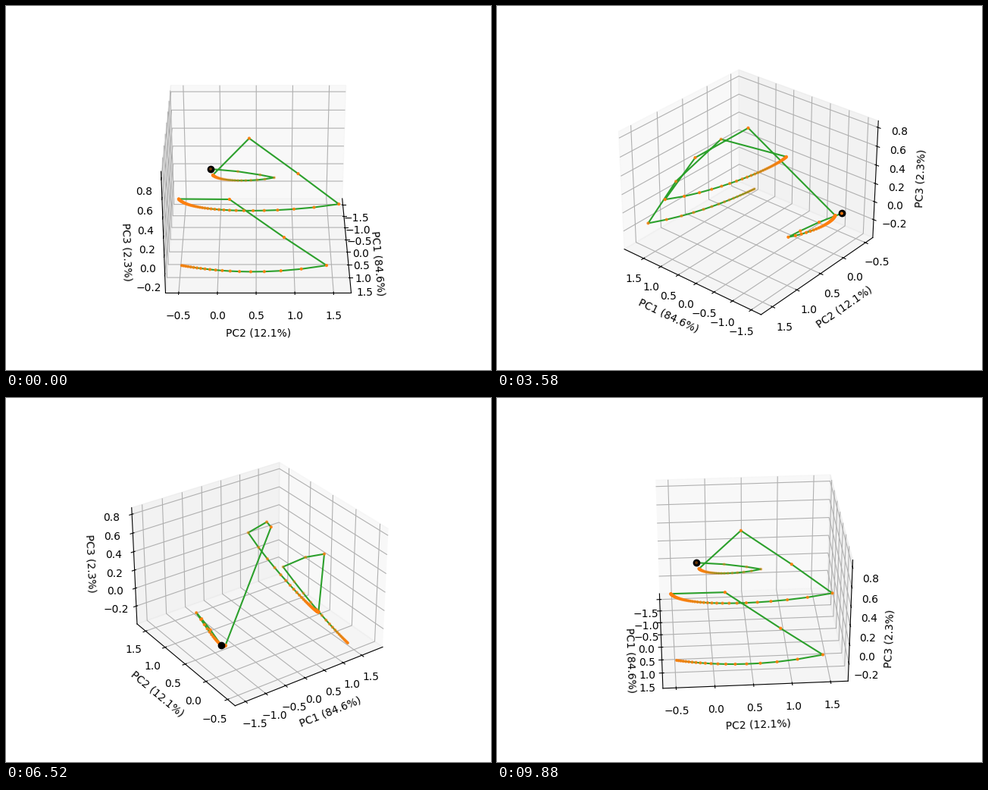
A matplotlib script that plays this animation: 640 px wide and 480 px high, repeating every 9.9 s.

```python
import numpy as np
import matplotlib.pyplot as plt
from matplotlib.animation import FuncAnimation

TICK = 20            # ms per animation frame
TICKS = 495
VIEWS = 119          # camera positions in one turn

XLIM, YLIM, ZLIM = (-1.758, 2.070), (-0.670, 1.727), (-0.4026, 0.8688)
BOX = np.array([4 / np.ptp(XLIM), 4 / np.ptp(YLIM), 3 / np.ptp(ZLIM)])


def decay(start, pull, drift, end, steps):
    """Points slowing down along the Bezier curve of four control points."""
    t = np.linspace(0, 1, 400)[:, None]
    curve = ((1 - t)**3 * start + 3 * t * (1 - t)**2 * pull
             + 3 * t**2 * (1 - t) * drift + t**3 * end)
    length = np.r_[0, np.cumsum(np.linalg.norm(np.diff(curve, axis=0) * BOX,
                                               axis=1))]
    k = np.arange(steps + 1)
    u = 1 - 0.45 * 0.76**k - 0.55 * 0.92**k
    s = u / u[-1] * length[-1]
    return np.column_stack([np.interp(s, length, c) for c in curve.T])


def leap(start, end, stops, bow):
    """Points on a slightly arched jump, without its end."""
    t = np.array(stops)[:, None]
    return start + (end - start) * t + bow * t * (1 - t) * [0, 0, 1]


def point(*xyz):
    return np.array(xyz)


origin, tip = point(-1.513, -0.140, 0.001), point(-1.197, 0.750, -0.0175)
path = np.vstack([
    leap(origin, tip, (0, 0.43, 0.78), 0.057),
    decay(tip, point(-1.237, 0.50, -0.07), point(-1.384, -0.02, -0.12),
          point(-1.380, -0.108, -0.034), 50),
    point(0.346, 0.410, 0.787), point(0.950, 1.040, 0.5656),
    decay(point(1.047, 1.572, 0.270), point(0.87, 0.85, 0.125),
          point(0.66, -0.37, 0.06), point(0.494, -0.523, 0.180), 50),
    point(1.455, 0.161, 0.4268), point(1.797, 0.857, 0.1178),
    decay(point(1.824, 1.408, -0.1755), point(1.72, 0.78, -0.296),
          point(1.564, 0.151, -0.344), point(1.353, -0.477, -0.312), 18),
])

fig = plt.figure(figsize=(6.4, 4.8), dpi=100)
ax = fig.add_subplot(projection="3d")
ax.plot(*path.T, color="C2")
ax.scatter(*path.T, color="C1", s=4)
# A hair outside the path, so the dot wins when it is the nearest point.
ax.scatter(*(origin - [1e-6, 0, 0]), color="black", s=36)
ax.set(xlim=XLIM, ylim=YLIM, zlim=ZLIM,
       xticks=np.arange(-1.5, 1.6, 0.5), yticks=np.arange(-0.5, 1.6, 0.5),
       zticks=np.arange(-0.2, 0.9, 0.2), xlabel="PC1 (84.6%)",
       ylabel="PC2 (12.1%)", zlabel="PC3 (2.3%)")


def snapshot(view):
    ax.view_init(elev=30, azim=view * 360 // VIEWS)
    fig.canvas.draw()
    return np.asarray(fig.canvas.buffer_rgba())[..., :3].copy()


# Each view is held for several ticks, so render it only once.
shots = [snapshot(view) for view in range(VIEWS)]
ax.set_visible(False)
picture = fig.figimage(shots[0])

# Every fifth view only flashes by.
views = np.arange(VIEWS)
schedule = np.repeat(views, np.where(views % 5 == 2, 1, 5))


def update(tick):
    picture.set_data(shots[schedule[tick]])
    return [picture]


anim = FuncAnimation(fig, update, frames=TICKS, interval=TICK, repeat=True,
                     repeat_delay=0)
plt.show()
```
